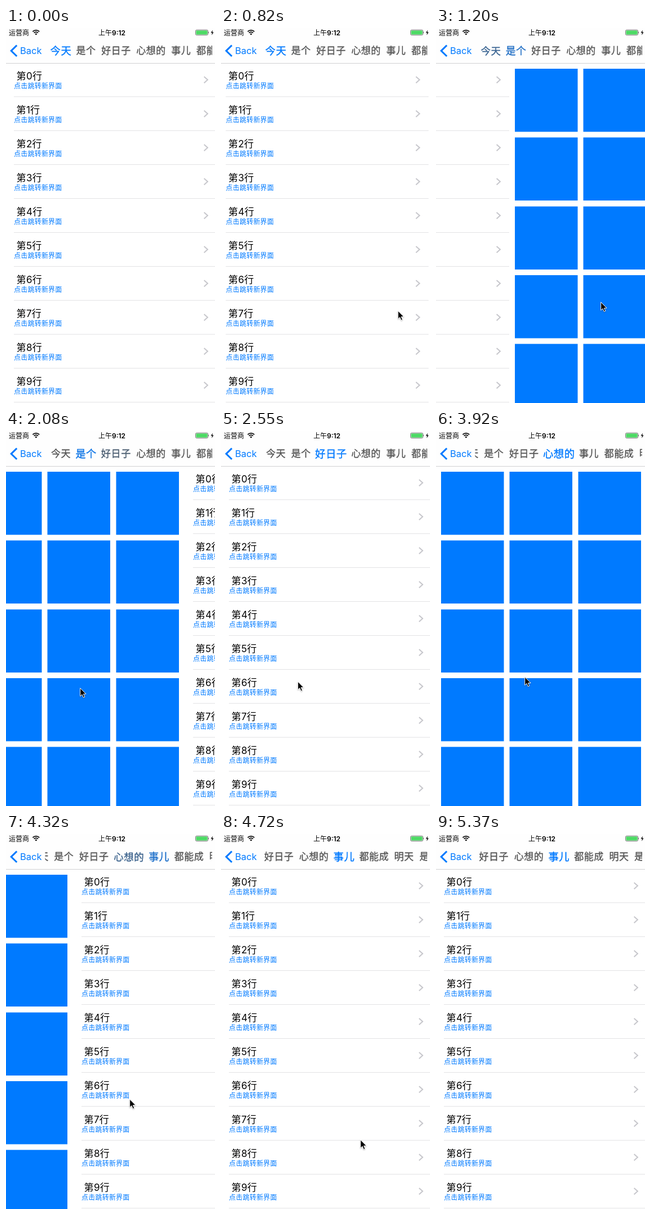
An HTML page that plays this animation: 371x663 px, repeating every 5700 ms.

```html
<!DOCTYPE html>
<html lang="zh-CN">
<head>
<meta charset="utf-8">
<title>Paged tabs</title>
<style>
  html, body { margin: 0; width: 100%; height: 100%; overflow: hidden; background: #fff; }
  svg { display: block; width: 371px; height: 663px; }
  text { font-family: Inter, "Noto Sans CJK SC", "Noto Sans CJK", sans-serif; white-space: pre; }
  .title { font-size: 17px; letter-spacing: .3px; }
  .sub { font-size: 12px; letter-spacing: .22px; fill: #007aff; }
  .tab { font-size: 17px; letter-spacing: .5px; font-weight: 500; stroke-width: .35px; }
  .back { font-size: 16.5px; fill: #007aff; }
  .status { font-size: 12px; }
  #cursor { filter: drop-shadow(0 1px 1px rgba(0, 0, 0, .3)); }
</style>
</head>
<body>
<svg viewBox="0 0 371 663">
  <defs>
    <clipPath id="tabClip"><rect x="69.5" y="20" width="296.5" height="42"/></clipPath>
  </defs>
  <rect width="371" height="663" fill="#fff"/>
  <g id="pages"></g>

  <rect width="371" height="62" fill="#fefefe"/>
  <rect y="62" width="371" height="1" fill="#d2d2d4"/>

  <text class="status" x="5" y="12.5">运营商</text>
  <g fill="none" stroke="#000" stroke-width="1.7">
    <path d="M47.4 6.4A8.3 8.3 0 0 1 59.2 6.4"/>
    <path d="M49.6 8.6A5.2 5.2 0 0 1 57 8.6"/>
  </g>
  <path d="M53.3 12.6L51.3 10.5A2.9 2.9 0 0 1 55.3 10.5Z"/>
  <text class="status" x="188" y="12.5" text-anchor="middle" font-weight="500">上午<tspan font-weight="600">9:12</tspan></text>
  <rect x="336.5" y="3.5" width="22" height="9" rx="1.8" fill="#fff" stroke="#555" stroke-width=".8"/>
  <rect x="337.5" y="4.5" width="20" height="7" rx=".8" fill="#4cd964"/>
  <path d="M359.4 6.2Q361 8 359.4 9.8Z" fill="#333"/>
  <path d="M367 3.5L363.6 8.6H366L365 12.8L368.6 7.4H366.2Z"/>

  <path d="M19.2 30.6L9.2 40.3L19.2 50" fill="none" stroke="#007aff" stroke-width="3"/>
  <text class="back" x="25" y="46">Back</text>
  <g clip-path="url(#tabClip)"><g id="tabs"></g></g>

  <path id="cursor" d="M0 0V14.4L3.3 11.4L5.7 16.8L8.1 15.7L5.8 10.5H10.4Z"
        fill="#000" stroke="#fff" stroke-width="1"/>
</svg>
<script>
const LOOP = 5700, TICK = 20;
const PAGE = 375, GAP = 10, CELL = (PAGE - 4 * GAP) / 3;
const TAB_MIDDLE = 218, TAB_SETTLE = 200;
const BLUE = [0, 122, 255], GRAY = [85, 85, 85];
const LABELS = ['今天', '是个', '好日子', '心想的', '事儿', '都能成', '明天', '是个'];

// Each swipe turns one page: start and duration in ms
const SWIPES = [[770, 714], [1940, 569], [2900, 815], [3980, 546]];
// Cursor path: time, x, y
const PATH = [
  [360, 366, 519], [470, 317, 502], [770, 317, 502], [1200, 292.7, 484.7], [1490, 190, 462],
  [1940, 190, 462], [2080, 131.7, 454.5], [3260, 143.7, 425], [3920, 157.7, 435],
  [4320, 219.7, 469], [5020, 268.7, 594.7], [5360, 328, 664]
];

const $ = id => document.getElementById(id);
const mix = (a, b, u) => a + (b - a) * u;
const half = v => Math.round(v * 2) / 2;
function smooth(u) {
  u = Math.min(1, Math.max(0, u));
  return u * u * (3 - 2 * u);
}

function add(parent, tag, attrs, text) {
  const el = document.createElementNS('http://www.w3.org/2000/svg', tag);
  for (const k in attrs) el.setAttribute(k, attrs[k]);
  if (text) el.textContent = text;
  parent.append(el);
  return el;
}

function addList(page) {
  for (let i = 0; i < 10; i++) {
    const row = add(page, 'g', { transform: `translate(0 ${62 + i * 60})` });
    add(row, 'text', { class: 'title', x: 19.6, y: 29.4 }, `第${i}行`);
    add(row, 'text', { class: 'sub', x: 15, y: 45.4 }, '点击跳转新界面');
    add(row, 'path', { d: 'M352.6 24L358.9 29.6L352.6 35.2', fill: 'none', stroke: '#c7c7cc', 'stroke-width': 2 });
    add(row, 'rect', { x: 15, y: 59, width: PAGE - 15, height: 1, fill: '#e3e3e5' });
  }
}

function addGrid(page) {
  const pitch = CELL + GAP, size = half(CELL);
  for (let i = 0; i < 15; i++) {
    const x = half(GAP + (i % 3) * pitch), y = half(72 + Math.floor(i / 3) * pitch);
    add(page, 'rect', { x, y, width: size, height: size, fill: '#007aff' });
  }
}

for (let i = 0; i <= SWIPES.length; i++) {
  const page = add($('pages'), 'g', { transform: `translate(${i * PAGE} 0)` });
  (i % 2 ? addGrid : addList)(page);
}

let tabX = 79.7;
const tabs = LABELS.map(label => {
  const w = label.length * 17.5, cx = tabX + w / 2;
  tabX += w + 9.6;
  const el = add($('tabs'), 'text', { class: 'tab', x: -w / 2 + .25, y: 6.4 }, label);
  return { el, cx };
});

function cursorAt(t) {
  const n = PATH.findIndex(p => p[0] > t);
  if (n < 1) return null;
  const a = PATH[n - 1], b = PATH[n], u = (t - a[0]) / (b[0] - a[0]);
  return [mix(a[1], b[1], u), mix(a[2], b[2], u)];
}

function draw(t) {
  let pos = 0, shift = 0;
  SWIPES.forEach(([start, time], i) => {
    pos += smooth((t - start) / time);
    // once a page rests, the strip brings its tab to the middle
    const goal = Math.max(0, tabs[i + 1].cx - TAB_MIDDLE);
    shift = mix(shift, goal, smooth((t - start - time) / TAB_SETTLE));
  });

  $('pages').setAttribute('transform', `translate(${half(-1 - pos * PAGE)} 0)`);
  tabs.forEach(({ el, cx }, i) => {
    const on = Math.max(0, 1 - Math.abs(pos - i));
    const color = `rgb(${GRAY.map((v, c) => Math.round(mix(v, BLUE[c], on)))})`;
    el.setAttribute('fill', color);
    el.setAttribute('stroke', color);
    el.setAttribute('transform', `translate(${cx - shift} 40) scale(${1 + .08 * on})`);
  });

  const at = cursorAt(t);
  $('cursor').setAttribute('visibility', at ? 'visible' : 'hidden');
  if (at) $('cursor').setAttribute('transform', `translate(${at})`);
}

function play() {
  const t = performance.now() % LOOP;
  draw(Math.floor(t / TICK) * TICK);
  requestAnimationFrame(play);
}
play();
</script>
</body>
</html>
```
